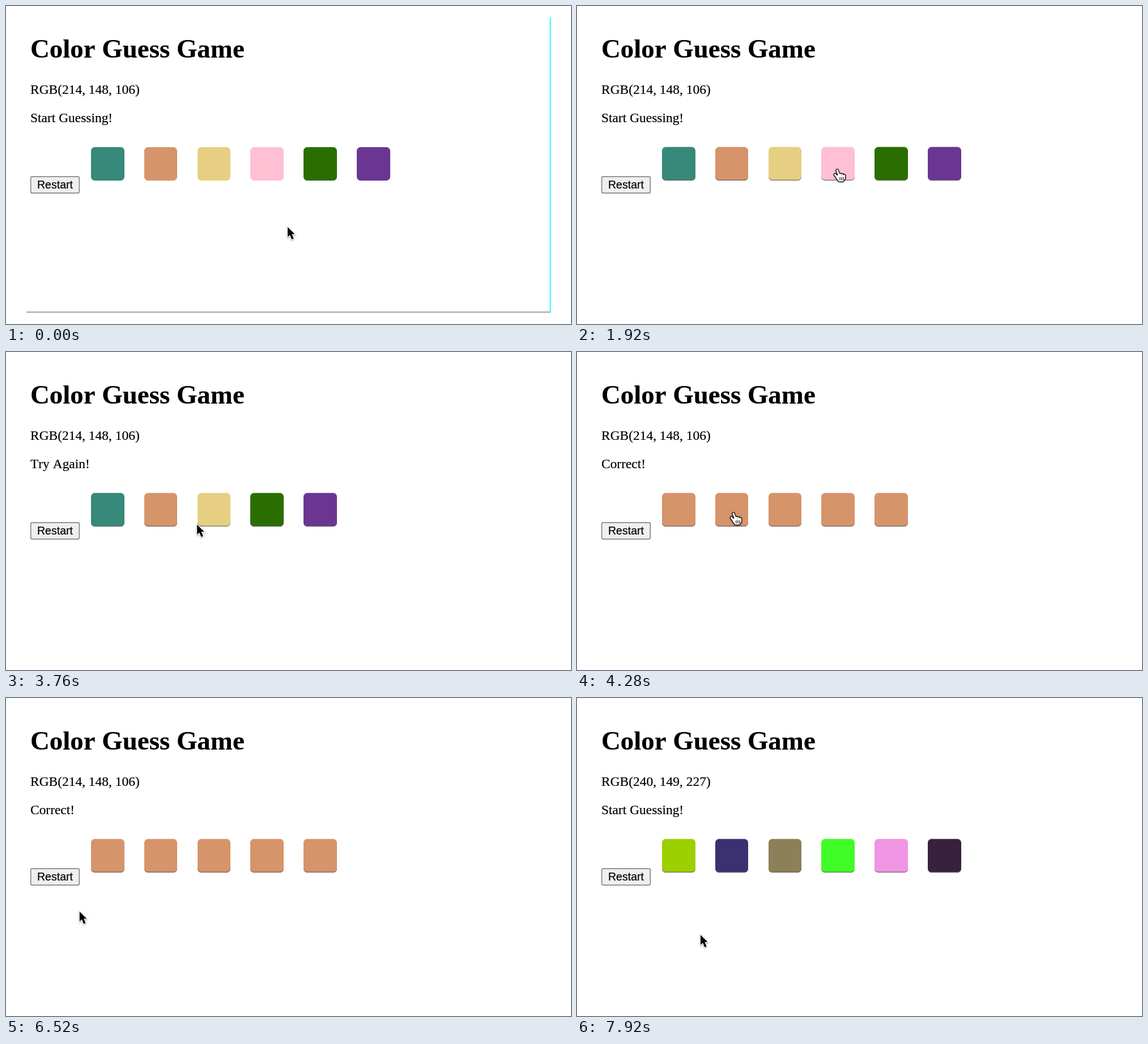
Recreate the animation shown at these times as an HTML page. Size 997 by 561 pixels, loop 8 s.

```html
<!DOCTYPE html>
<html lang="en">
<head>
<meta charset="utf-8">
<title>Color Guess Game</title>
<style>
  html, body { margin: 0; width: 100%; height: 100%; overflow: hidden; background: #fff; }
  svg { position: absolute; left: 0; top: 0; }
  text { font: 23.45px "Liberation Serif", Times, serif; font-kerning: none; stroke: #000; stroke-width: .2px; }
  .title { font-size: 46.9px; font-weight: bold; }
  .label { font: 19.55px "Liberation Sans", Arial, sans-serif; }
  .tile { position: absolute; top: 249px; width: 58.6px; height: 58.6px; border-radius: 6.5px; }
  .edge { box-shadow: 0 -1px color-mix(in srgb, currentColor 35%, #fff), inset 0 -1.5px #666b; }
  #arrow, #hand { filter: drop-shadow(0 1.5px 1px #0006); }
  #hand { fill: none; stroke-linecap: round; stroke-linejoin: round; }
</style>
</head>
<body>
<div id="tiles"></div>
<svg width="997" height="561">
  <defs>
    <path id="fingers" d="M1 2L5 12M6.5 9V14M10 9.5V14M13.5 11V15M-2.5 9.5L2.5 16M2 12L13.5 13V16L10.5 20H5L1 15Z"/>
  </defs>
  <g id="frame" fill="none">
    <path d="M36 540H961" stroke="#858585" stroke-width="1.4"/>
    <path d="M960.5 20V539" stroke="#20ffff" stroke-width="2"/>
  </g>
  <text class="title" x="43" y="91">Color Guess Game</text>
  <text id="goal" x="43" y="155"></text>
  <text id="status" x="43" y="205"></text>
  <rect x="43.7" y="301" width="85.6" height="29" rx="2.5" fill="#efefef" stroke="#767676" stroke-width="1.4"/>
  <text class="label" x="55" y="322">Restart</text>
  <path id="arrow" d="M0 0V17.6L4 13.9 7.3 21.7 10.7 20.2 7.4 12.6H12.6Z" stroke="#fff" stroke-width="2.6" paint-order="stroke"/>
  <g id="hand">
    <use href="#fingers" stroke="#000" stroke-width="5.6"/>
    <use href="#fingers" stroke="#fff" stroke-width="3.2" fill="#fff"/>
    <path d="M6 14v5m3-5v5m3-5v5" stroke="#000" stroke-width="1.1"/>
  </g>
</svg>
<script>
const LOOP = 8000, FRAME_END = 480, LEFT = 150, TILE = 58.6, PITCH = 93.8;
const $ = id => document.getElementById(id);

const goal = 'RGB(214, 148, 106)', orange = '#d6946a';
const first = ['#37897a', orange, '#e6cf82', '#ffc0d4', '#2b6e00', '#6b3692'];
const second = ['#9cd000', '#3b3070', '#8d7f58', '#40fc27', '#f095e3', '#38203f'];

// Game states; each begins with a click
const states = [
  { t: 0, goal, status: 'Start Guessing!', colors: first },
  { t: 2240, goal, status: 'Try Again!', colors: first.filter((c, i) => i !== 3) },
  { t: 4200, goal, status: 'Correct!', colors: Array(5).fill(orange) },
  { t: 6960, goal: 'RGB(240, 149, 227)', status: 'Start Guessing!', colors: second },
];

// Pointer moves: start, end, and where each one leads; it rests in between
const home = { x: 497, y: 390 };
const moves = [
  { from: 480, to: 840, x: 481, y: 393 },
  { from: 860, to: 1280, x: 471, y: 405 },
  { from: 1320, to: 1640, x: 458, y: 288 },
  { from: 2640, to: 2880, x: 463, y: 348 },
  { from: 3440, to: 4000, x: 275, y: 283 },
  { from: 5000, to: 5200, x: 286, y: 289 },
  { from: 5960, to: 6520, x: 130, y: 377 },
  { from: 6520, to: 6760, x: 98, y: 320 },
  { from: 7160, to: 7760, x: 218, y: 418 },
];
const ease = k => 1 - (1 - k) ** 1.3;

function pointerAt(t) {
  let { x, y } = home;
  for (const m of moves) {
    const k = ease(Math.min(1, Math.max(0, (t - m.from) / (m.to - m.from))));
    x += (m.x - x) * k;
    y += (m.y - y) * k;
  }
  return [x, y];
}

const tiles = first.map((c, i) => {
  const tile = document.createElement('div');
  tile.style.left = LEFT + i * PITCH + 'px';
  return $('tiles').appendChild(tile);
});

function isOverTile(x, y, count) {
  const column = (x - LEFT) / PITCH;
  return y > 249 && y < 249 + TILE && column >= 0 && column < count && column % 1 < TILE / PITCH;
}

function draw(t) {
  const state = states.findLast(s => s.t <= t);
  const framed = t < FRAME_END;
  $('goal').textContent = state.goal;
  $('status').textContent = state.status;
  $('frame').style.display = framed ? '' : 'none';

  tiles.forEach((tile, i) => {
    const color = state.colors[i];
    tile.className = framed ? 'tile' : 'tile edge';
    tile.style.display = color ? '' : 'none';
    tile.style.background = tile.style.color = color || '';
  });

  const [x, y] = pointerAt(t);
  const over = isOverTile(x, y, state.colors.length);
  for (const id of ['arrow', 'hand']) {
    $(id).setAttribute('transform', `translate(${x} ${y})`);
    $(id).style.display = (id === 'hand') === over ? '' : 'none';
  }
}

const start = performance.now();
function tick() {
  draw((performance.now() - start) % LOOP);
  requestAnimationFrame(tick);
}
tick();
</script>
</body>
</html>
```
